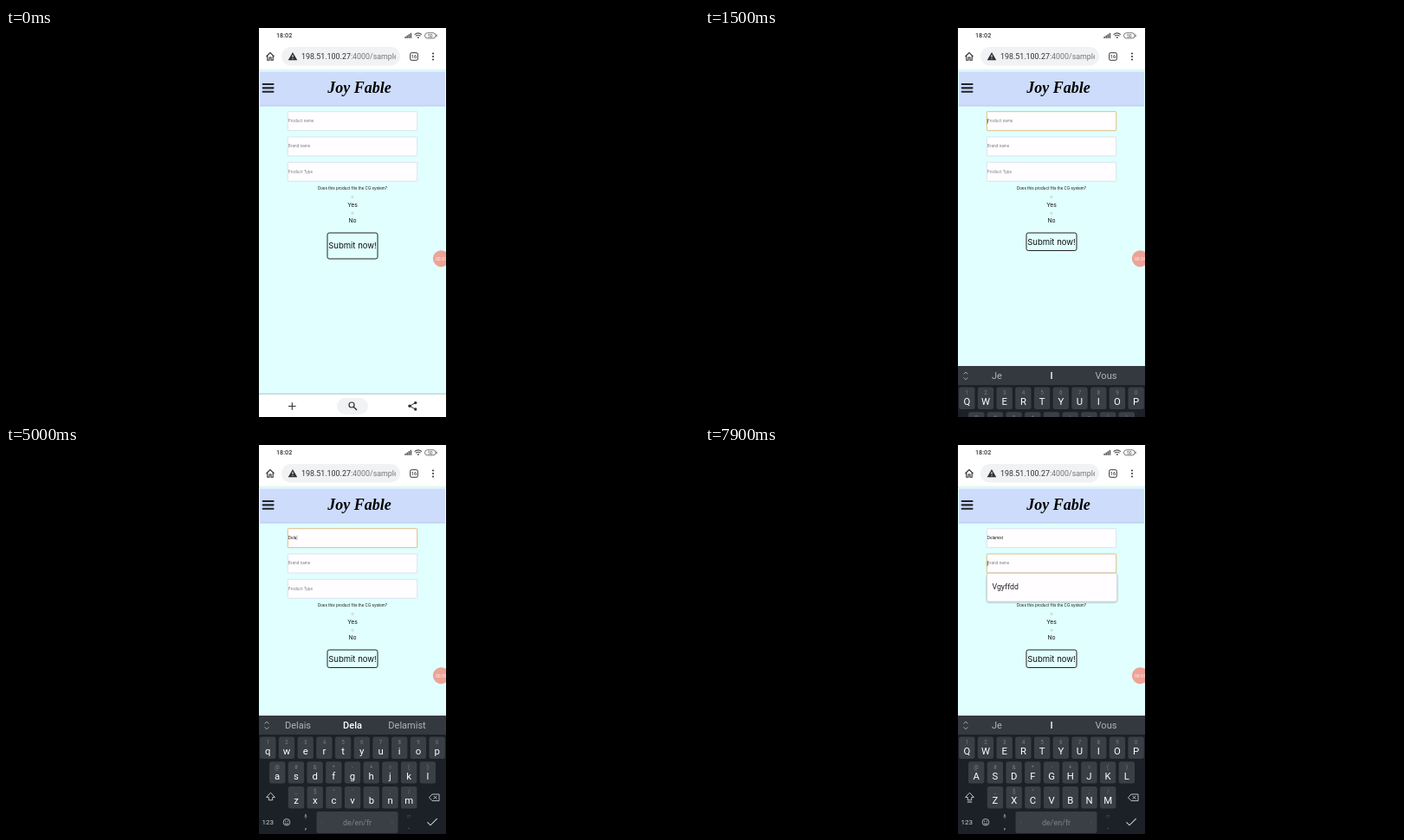
These frames come from a looping animation (800 by 450 pixels, 8000 ms). An HTML page:

```html
<!DOCTYPE html>
<html lang="en">
<head>
<meta charset="utf-8">
<title>Product form</title>
<style>
html, body { margin: 0; width: 100%; height: 100%; overflow: hidden; background: #000; }
svg { display: block; width: 100%; height: 100%; }
text { font-family: Roboto, sans-serif; white-space: pre; }
.form { font-family: Inter, sans-serif; }
.title { font-family: "Liberation Serif", serif; font-weight: 700; font-style: italic; }
</style>
</head>
<body>
<svg id="stage" viewBox="0 0 800 450"></svg>
<script>
const LOOP = 8000, FOCUS = 1200, RESIZE = 1300, NEXT_FIELD = 7500;
const stage = document.getElementById('stage');

// Start time, field content and keyboard suggestions.
const EDITS = [
  [0, '', 'Je I Vous'],
  [3500, 'D', 'Du D Die'],
  [3700, 'De', 'Der De De_rien'],
  [4200, 'Del', 'Delta Del Deluge'],
  [4700, 'Dela', 'Delais Dela Delamist'],
  [5300, 'Delam', 'Delais Delam Delamist'],
  [6300, 'Delamist', 'ist is and'],
  [NEXT_FIELD, 'Delamist', 'Je I Vous']
];
const PRESSES = [[3400, 3500, 'D'], [3600, 3700, 'e'], [4500, 4700, 'a'], [5200, 5300, 'm']];
const ROWS = [
  { keys: 'qwertyuiop', hints: '1234567890', x: 302.3, y: 337.5 },
  { keys: 'asdfghjkl', hints: '@#&*-+=()', x: 313.2, y: 366.2 },
  { keys: 'zxcvbnm', hints: '_$"\':;/', x: 335, y: 395 }
];

const esc = s => s.replace(/&/g, '&amp;').replace(/</g, '&lt;');
const rect = (x, y, w, h, fill, r = 0, extra = '') =>
  `<rect x="${x}" y="${y}" width="${w}" height="${h}" rx="${r}" fill="${fill}" ${extra}/>`;
const circle = (x, y, r, fill, extra = '') =>
  `<circle cx="${x}" cy="${y}" r="${r}" fill="${fill}" ${extra}/>`;
const line = (d, color, width = 1, extra = '') =>
  `<path d="${d}" fill="none" stroke="${color}" stroke-width="${width}" ${extra}/>`;
const shape = (d, fill) => `<path d="${d}" fill="${fill}"/>`;
const text = (s, x, y, size, fill, anchor = 'middle', extra = '') =>
  `<text x="${x}" y="${y}" font-size="${size}" fill="${fill}" text-anchor="${anchor}" ${extra}>${esc(s)}</text>`;

function browserBar() {
  const ink = '#303236';
  let s = rect(292, 0, 216, 48, '#fff');
  s += text('18:02', 312, 11.3, 7.2, '#333', 'start', 'font-weight="500"');
  for (let i = 0; i < 4; i++) s += rect(460.3 + i * 2.1, 10 - i * 1.4, 1.6, 1.8 + i * 1.4, '#555');
  s += line('M471.5 7.6Q475.8 4.2 480 7.6M473 9.3Q475.8 7.2 478.5 9.3', '#555', 1.2);
  s += circle(475.8, 11, 1, '#555');
  s += rect(483.5, 5.7, 12.5, 6.2, 'none', 3, 'stroke="#555" stroke-width=".8"');
  s += rect(496.5, 7.5, 1, 2.6, '#555') + text('50', 489.7, 10.7, 5, '#444');
  s += line('M300.5 33L305 28.6L309.5 33M301.8 32V37.3H304V34H306V37.3H308.2V32', ink, 1.1);
  s += rect(318, 22, 137, 21.5, '#f1f2f4', 10.7);
  s += shape('M331 28L336.3 37.2H325.7Z', ink) + rect(330.5, 31, 1, 3, '#f1f2f4') + rect(330.5, 35, 1, 1, '#f1f2f4');
  s += `<g clip-path="url(#address)"><text x="341" y="36.3" font-size="8.9" fill="#303236">198.51.100.27<tspan fill="#777">:4000/samples</tspan></text></g>`;
  s += rect(466.7, 28.7, 8.6, 8.6, 'none', 1.5, `stroke="${ink}"`);
  s += text('16', 471, 35, 5.2, ink, 'middle', 'font-weight="500"');
  for (const y of [29.5, 33, 36.5]) s += circle(493, y, 1, ink);
  return s;
}

function header() {
  let s = rect(292, 48, 216, 402, '#e0fffe') + rect(293, 50.5, 214, 40, '#cddcfb');
  s += rect(293, 89.6, 214, .8, '#b5c9e2') + rect(292, 47.8, 216, .8, '#d4e5e8');
  for (const y of [64, 68.3, 72.7]) s += rect(295.7, y, 13.8, 2.1, '#20242b', .8);
  return s + text('Joy Fable', 408, 75, 18, '#000', 'middle', 'class="title"');
}

function field(y, placeholder, value, focused, caret) {
  let s = rect(325.3, y, 149.4, 22, '#fffdff', .8,
    `stroke="${focused ? '#dfbd84' : '#d3dfe6'}" stroke-width="${focused ? 1 : .8}"`);
  s += text(value || placeholder, 325.8, y + 12.4, 4.5, value ? '#111' : '#777', 'start', 'class="form"')
    .replace('</text>', caret && value ? '<tspan fill="#222">|</tspan></text>' : '</text>');
  if (caret && !value) s += rect(325.8, y + 8.6, .6, 5.5, '#333');
  return s;
}

function form(t, edit) {
  const second = t >= NEXT_FIELD, first = t >= FOCUS && !second;
  const since = second ? NEXT_FIELD : Math.max(FOCUS, edit[0]);
  const caret = Math.floor((t - since) / 500) % 2 === 0 && (t < 6300 || second);
  let s = field(96.7, 'Product name', edit[1], first, first && caret);
  s += field(126, 'Brand name', '', second, second && caret);
  s += field(155.3, 'Product Type', '', false, false);
  s += text('Does this product fits the CG system?', 400, 186.6, 4.5, '#111', 'middle', 'class="form"');
  [['Yes', 206.6], ['No', 225.3]].forEach(([label, y]) => {
    s += circle(400, y - 11.1, 1.3, '#d5e4e5', 'stroke="#bccdcf" stroke-width=".4"');
    s += text(label, 400, y, 6.8, '#111', 'middle', 'class="form"');
  });
  const height = t < RESIZE ? 30 : 20.5;
  s += rect(371, 237, 58, height, 'none', 2.2, 'stroke="#222" stroke-width="1"');
  return s + text('Submit now!', 400, 240.3 + height / 2, 9.5, '#111', 'middle', 'class="form"');
}

function dropdown(y, bottom, items, firstBaseline) {
  let s = rect(325.5, y, 150, bottom - y, '#fffdff', 2.5, 'stroke="#c3cdcf" stroke-width=".6" filter="url(#shadow)"');
  items.forEach((item, i) => {
    if (i) s += rect(326, 149, 149, .6, '#ddd');
    s += text(item, 331.5, firstBaseline + i * 28, 8.8, '#222', 'start');
  });
  return s;
}

function toolbar() {
  const ink = '#303236';
  let s = rect(292, 422.5, 216, 1.5, '#c3d5d7') + rect(292, 424, 216, 26, '#fff');
  s += line('M326 437.5H334.6M330.3 433.2V441.8', ink, 1.1) + rect(382, 428, 36, 19, '#f0f2f4', 9.5);
  s += circle(399, 436, 3, 'none', `stroke="${ink}" stroke-width="1.2"`) + line('M401.2 438.2L405 442', ink, 1.4);
  s += line('M472.5 433.7L466 437.3L472.5 441', ink, 1);
  return s + circle(472.7, 433.6, 1.7, ink) + circle(466, 437.3, 1.7, ink) + circle(472.7, 441, 1.7, ink);
}

function keyboard(t, edit) {
  const p = Math.min(1, Math.max(0, (t - 1420) / 330));
  const caps = t < 3500 || t >= NEXT_FIELD;
  const press = PRESSES.find(([from, to]) => t >= from && t < to);
  let popup = '';
  let s = `<g transform="translate(0 ${137 * (1 - p) ** 2})">`;
  s += rect(292, 313, 216, 137, '#1b2126') + rect(292, 313, 216, 22, '#343940');
  s += line('M298.6 322.5L301 320L303.4 322.5M298.6 326.3L301 328.8L303.4 326.3', '#adb2b6', .9);
  edit[2].split(' ').forEach((word, i) => {
    s += text(word.replace('_', ' '), 337 + 63 * i, 328.2, 11, i === 1 ? '#fff' : '#b0b4b9', 'middle',
      i === 1 ? 'font-weight="500"' : '');
  });
  for (const row of ROWS) {
    [...row.keys].forEach((key, i) => {
      const x = row.x + 21.7 * i, label = caps ? key.toUpperCase() : key;
      s += rect(x - 9.2, row.y, 18.4, 25.4, '#3a3f45', 2.5);
      s += text(row.hints[i], x, row.y + 8.4, 6.3, '#777c82');
      s += text(label, x, row.y + 20.3, 11.3, '#fff');
      if (press && press[2] === label) {
        popup = rect(x - 11, row.y - 29.5, 22, 56, '#535960', 3.5) + text(label, x, row.y - 8, 15, '#fff');
      }
    });
  }
  const ink = '#d0d3d6';
  s += line('M305.5 402.2L300.6 407.5H303.3V410.8H307.7V407.5H310.4Z', ink, .9);
  if (caps) s += line('M302.8 413H308.2', ink, 1);
  s += line('M488.5 407.8L492 404H500V411.6H492ZM493.6 405.9L497.4 409.7M497.4 405.9L493.6 409.7', ink, .9);
  s += text('123', 302.3, 439.3, 8, ink);
  s += circle(324, 436.3, 3.8, 'none', `stroke="${ink}" stroke-width=".8"`) + line('M322 437.4Q324 439.8 326 437.4', ink, .8);
  s += circle(322.7, 435.2, .6, ink) + circle(325.3, 435.2, .6, ink);
  s += rect(345.1, 427, 1.7, 3.3, '#888d92', .8) + line('M344.2 429.7Q346 432.5 347.8 429.7M346 431V432.5', '#888d92', .5);
  s += text(',', 346, 443.5, 10, ink);
  s += rect(358.5, 424, 94, 25, '#3a3f45', 2.5) + text('de/en/fr', 405.5, 439.7, 9, '#7c8288');
  s += line('M365.5 434.8L363.8 436.5L365.5 438.2M444.8 434.8L446.5 436.5L444.8 438.2', '#50565c', .7);
  s += text('!?', 465, 432, 5, '#61676c') + text('.', 465, 444, 10, '#777c82');
  s += line('M486.5 436.3L490 439.8L497.7 432.2', ink, 1.1);
  return s + popup + '</g>';
}

function recorder(t) {
  const seconds = 33 + Math.floor((t + 200) / 1000);
  return circle(502.4, 266.8, 9.6, '#eda397') + text('00:' + seconds, 502.4, 268.7, 5.2, '#fff0ec');
}

const defs = `<defs>
  <clipPath id="phone"><rect x="292" width="216" height="450"/></clipPath>
  <clipPath id="address"><rect x="340" y="22" width="110" height="22"/></clipPath>
  <filter id="shadow" x="-5%" y="-10%" width="110%" height="125%"><feDropShadow dx="0" dy=".7" stdDeviation=".8" flood-opacity=".35"/></filter>
</defs>`;

function draw(t) {
  const edit = EDITS.filter(e => e[0] <= t).pop();
  let s = header() + form(t, edit);
  if (t >= 1700 && t < 3500) s += dropdown(119, 180, ['Chhfd', 'Sham'], 138);
  if (t >= 7600) s += dropdown(148.5, 181, ['Vgyffdd'], 167.3);
  s += t < RESIZE ? toolbar() : keyboard(t, edit);
  stage.innerHTML = `${defs}<rect width="800" height="450"/><g clip-path="url(#phone)">${s}${browserBar()}${recorder(t)}</g>`;
}

const start = performance.now();
function tick() {
  draw((performance.now() - start) % LOOP);
  requestAnimationFrame(tick);
}
tick();
</script>
</body>
</html>
```
